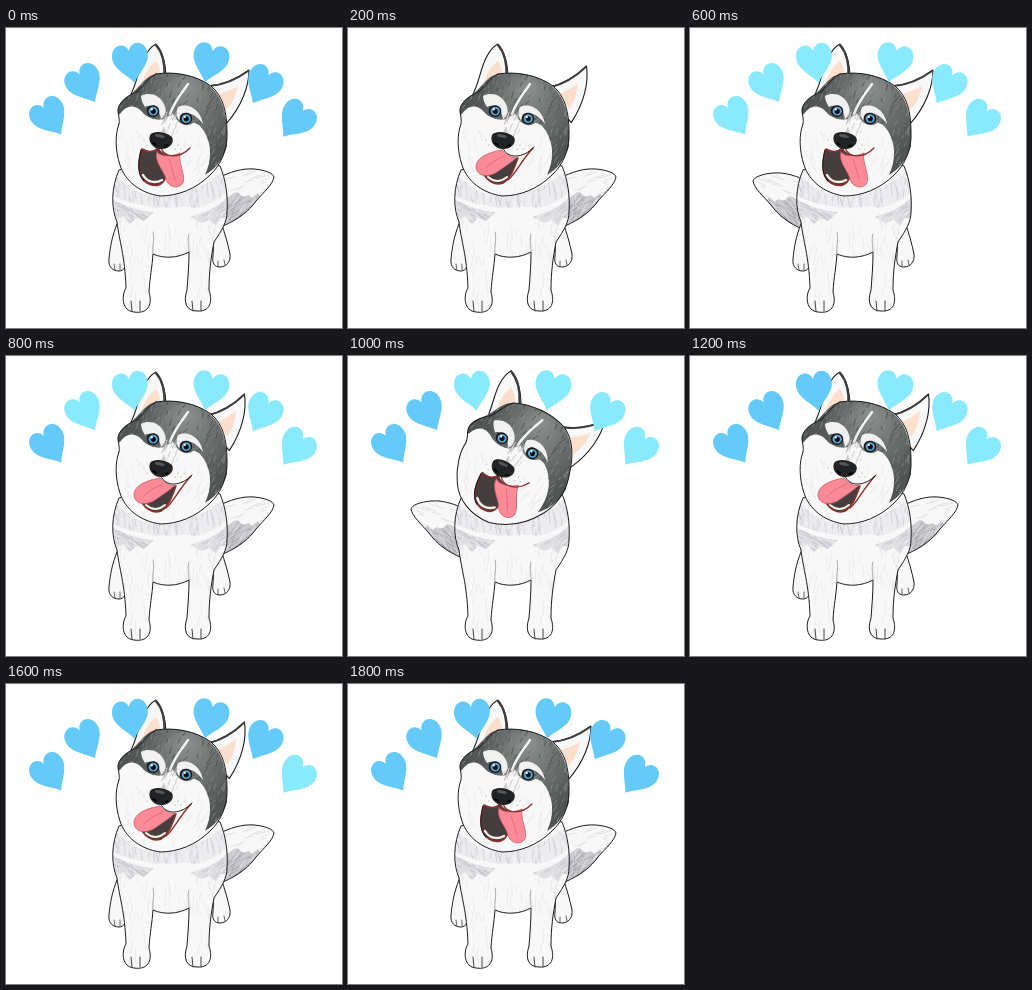
An HTML page with a canvas that plays this animation: 336x300 px, repeating every 2000 ms.

```html
<!DOCTYPE html>
<html lang="en">
<head>
<meta charset="utf-8">
<title>Happy husky</title>
<style>
html, body { margin: 0; width: 100%; height: 100%; overflow: hidden; background: #fff; }
canvas { display: block; width: 336px; height: 300px; }
</style>
</head>
<body>
<canvas id="stage" width="336" height="300"></canvas>
<script>
const ctx = document.getElementById('stage').getContext('2d');
const STEP = 200;
const INK = '#1c1d20', WHITE = '#f9f8f8', PEACH = '#fbdfcd';
const DARK_HEART = '#64caf9', LIGHT_HEART = '#88e9ff';

// Each step: head pose, tail side, raised paws, hind legs, blue hearts (-1 hides all)
const steps = [
  ['pant', 'right', 0, 1, 6],
  ['lick', 'right', 0, 1, -1],
  ['tilt', 'right', 1, 1, -1],
  ['pant', 'left', 0, 1, 0],
  ['lick', 'right', 0, 1, 1],
  ['tilt', 'left', 0, 0, 2],
  ['lick', 'right', 0, 1, 3],
  ['pant', 'right', 1, 1, 4],
  ['lick', 'right', 0, 1, 5],
  ['pant', 'right', 0, 1, 6]
];

// Left and right ear turn in degrees
const earTurn = { pant: [0, 0], lick: [0, -8], tilt: [-13, 0] };

// x, y, tilt in degrees
const hearts = [
  [44, 89, -33], [79, 56, -29], [125, 34, -10],
  [204, 34, 14], [257, 57, 29], [290, 92, 37]
];

function random(seed) {
  return () => (seed = (seed * 16807) % 2147483647) / 2147483647;
}

function shape(d, fill, line, width = 1) {
  const p = new Path2D(d);
  if (fill) { ctx.fillStyle = fill; ctx.fill(p); }
  if (line) { ctx.strokeStyle = line; ctx.lineWidth = width; ctx.stroke(p); }
}

function line(d, color = INK, width = 1) {
  shape(d, null, color, width);
}

// Draw with the stage turned about a point
function turned(x, y, degrees, paint) {
  ctx.save();
  ctx.translate(x, y);
  ctx.rotate(degrees * Math.PI / 180);
  ctx.translate(-x, -y);
  paint();
  ctx.restore();
}

// Short pencil hairs inside a path; the box is x, y, width, height
function fur(d, [x, y, w, h], count, colors, slope, length) {
  const rnd = random(count * 31 + x);
  ctx.save();
  ctx.clip(new Path2D(d));
  ctx.lineWidth = 0.8;
  for (let i = 0; i < count; i++) {
    const px = x + rnd() * w, py = y + rnd() * h;
    const a = slope + (rnd() - 0.5) * 0.7, n = length * (0.5 + rnd());
    ctx.strokeStyle = colors[i % colors.length];
    ctx.beginPath();
    ctx.moveTo(px, py);
    ctx.lineTo(px + Math.cos(a) * n, py + Math.sin(a) * n);
    ctx.stroke();
  }
  ctx.restore();
}

function dot(x, y, rx, ry, fill, turn = 0) {
  ctx.beginPath();
  ctx.ellipse(x, y, rx, ry, turn, 0, Math.PI * 2);
  ctx.fillStyle = fill;
  ctx.fill();
}

function heart([x, y, tilt], color) {
  ctx.save();
  ctx.translate(x, y);
  ctx.rotate(tilt * Math.PI / 180);
  shape('M0 21C-5 13-18 5-18-6C-18-20-3-22 0-11C3-22 18-20 18-6C18 5 5 13 0 21Z', color);
  ctx.restore();
}

function tail(side) {
  ctx.save();
  if (side === 'left') {
    ctx.translate(331, 4);
    ctx.scale(-1, 1);
  }
  const d = 'M212 150C224 144 236 140 248 141C259 142 267 145 268 149C267 156 258 164 250 173C243 183 233 191 217 198Z';
  shape(d, WHITE);
  const grey = 'M216 172C224 172 228 160 234 166C238 172 242 164 246 170L252 165L254 169C244 181 236 190 216 198Z';
  shape(grey, '#c9c9cd');
  fur(grey, [212, 160, 44, 40], 120, ['#a3a3aa', '#b9b9bf', '#dcdce0', '#94949b'], -0.75, 9);
  fur(d, [220, 141, 46, 36], 30, ['#dcdce0'], -0.5, 9);
  line(d, INK, 1);
  ctx.restore();
}

function hindLegs() {
  shape('M111 196C106 208 104 220 103 231C102 239 107 243 113 243C118 243 121 238 120 230L118 204Z', WHITE, INK);
  line('M108 236L109 242M114 236L114 242', '#55555a', 0.9);
  shape('M215 194C219 206 222 216 224 226C225 234 220 239 214 239C208 239 206 235 207 228L208 204Z', WHITE, INK);
  line('M212 233L212 238M218 232L219 237', '#55555a', 0.9);
}

function torso(raised) {
  const up = raised * 6, l = raised * -1.5, r = raised * 2;
  const y = n => n - up, a = n => n + l, b = n => n + r;
  const d = `M113 142C105 160 105 180 111 194C113 212 119 228 ${a(120)} ${y(260)}
    C${a(115)} ${y(268)} ${a(116)} ${y(283)} ${a(128)} ${y(284)}
    C${a(141)} ${y(286)} ${a(147)} ${y(278)} ${a(143)} ${y(264)}
    C144 248 146 240 147 226C158 231 172 230 183 224
    C183 238 182 248 ${b(181)} ${y(262)}
    C${b(177)} ${y(274)} ${b(180)} ${y(283)} ${b(191)} ${y(283)}
    C${b(204)} ${y(284)} ${b(207)} ${y(274)} ${b(203)} ${y(262)}
    C203 244 205 230 208 214C216 202 221 194 221 184C222 168 220 152 214 138Z`;
  shape(d, WHITE);
  const collar = 'M110 146C124 164 142 168 158 169C180 167 202 156 217 143L221 164C210 174 200 178 188 180C176 176 168 182 158 179C148 182 138 176 130 176C120 174 112 170 107 168Z';
  const left = 'M107 172C120 178 134 184 148 184L138 193L130 190L124 196L117 189L110 190Z';
  const right = 'M222 168C212 180 198 185 184 189L196 195L204 192L210 198L215 190L221 190Z';
  const greys = ['#c6c6cc', '#d6d6db', '#f3f3f5', '#bcbcc3'];
  shape(collar, '#ececef');
  fur(collar, [106, 144, 116, 40], 170, ['#d2d2d7', '#dedee2', '#f5f5f6', '#cacad0'], 1.5, 9);
  shape(left, '#dedee2');
  fur(left, [105, 170, 46, 28], 80, greys, 0.6, 8);
  shape(right, '#dedee2');
  fur(right, [183, 166, 42, 34], 80, greys, 2.45, 8);
  fur(d, [112, 186, 104, 44], 55, ['#e6e6e9', '#edebea'], 1.55, 12);
  fur(d, [116, 225, 92, 55], 22, ['#e8e8ec'], 1.55, 10);
  line(d);
  line('M147 226C146 218 149 212 147 204M183 224C183 216 181 212 183 206', '#a2a2a8', 0.9);
  for (const x of [a(129), b(190)])
    line(`M${x - 4} ${y(273)}L${x - 3} ${y(283)}M${x + 5} ${y(273)}L${x + 5} ${y(283)}`, '#45454a', 1);
}

function leftEar() {
  shape('M124 68C131 56 132 42 138 30C142 22 146 18 150 16C157 24 160 36 160 52L146 66Z', WHITE, INK, 1.1);
  shape('M135 57C138 46 143 38 150 33C154 39 155 46 153 53Z', PEACH);
  line('M150 17C157 25 159 36 158.500 49', '#3c3d40', 2.2);
}

function rightEar() {
  shape('M202 58C218 57 232 50 243 42C243 58 236 78 220 96L210 80Z', WHITE, INK, 1.1);
  shape('M211 66C219 65 226 61 232 58C230 68 226 76 220 82Z', PEACH);
  line('M204 58C218 57 231 51 242 43', '#3c3d40', 2);
}

function eye(x, y) {
  dot(x, y, 6.3, 5.8, '#17181b', 0.2);
  dot(x + 0.2, y + 0.2, 4.6, 4.4, '#5ba4cf');
  dot(x + 0.3, y + 0.3, 2.5, 2.6, '#0a0c10');
  dot(x - 1.2, y - 1.6, 1.1, 1.1, '#fff');
}

function openMouth() {
  shape('M136 121C132 134 131 148 141 155C150 160 157 157 160 149L166 128C160 129 154 124 152 120C147 125 141 124 136 121Z', '#463e3e', '#8f2f2c', 1.6);
  line('M135 122C132 134 131 146 138 153', INK, 1.2);
  line('M137 147C141 154 149 156 156 152', '#f7f1ea', 2.4);
  shape('M151 124C156 130 167 128 174 125C172 135 180 147 177 155C172 162 162 159 160 151C158 142 148 134 151 124Z', '#fb8a96', '#c8606b', 0.8);
  line('M163 131C165 139 168 145 169 152', '#e06f7c');
  line('M155 120C159 130 173 131 184 120', '#7d2f2d', 1.2);
}

function lickMouth() {
  shape('M135 145C139 153 147 158 155 155C163 150 166 141 170 130L156 132Z', '#463e3e', '#8f2f2c', 1.5);
  line('M140 149C146 154 153 154 159 149', '#f7f1ea', 2);
  line('M160 152C168 146 172 134 185 120', '#8f2f2c', 1.4);
  shape('M154 122C142 124 128 129 128 139C129 150 142 149 149 144C156 139 163 135 168 130C162 129 157 126 154 122Z', '#fb8a96', '#c8606b', 0.8);
  line('M157 128C150 131 143 134 138 140', '#e06f7c');
  line('M155 120C159 131 175 131 186 119');
}

function head(pose) {
  const [leftTurn, rightTurn] = earTurn[pose];
  turned(142, 58, leftTurn, leftEar);
  turned(212, 72, rightTurn, rightEar);
  const skull = 'M150 46C168 43 190 47 205 58C217 68 221 84 221 104C222 122 214 138 204 147C190 161 172 168 154 168C134 165 119 153 114 137C109 122 109 106 113 96C114 91 112 87 112 81C114 72 124 67 132 63C138 56 144 49 150 46Z';
  shape(skull, WHITE);
  const mask = 'M112 86C111 80 114 73 122 68C132 63 138 48 150 46C175 42 198 50 208 62C220 76 222 98 221 118C217 132 209 141 199 147C206 132 206 116 198 103C194 97 191 95 187 95C182 99 175 97 171 92L167 86L158 91C151 93 143 90 138 86C132 78 125 77 120 80C116 82 114 88 112 86Z';
  const shade = ctx.createRadialGradient(180, 60, 6, 182, 78, 52);
  shade.addColorStop(0, '#888b8b');
  shade.addColorStop(1, '#505453');
  shape(mask, shade);
  fur(mask, [108, 44, 116, 104], 420, ['#4a4e4d', '#7b7e7e', '#606463', '#8b8e8e'], -1.1, 5);
  shape('M135 68C143 64 153 66 158 76C161 82 160 88 155 91C154 82 146 75 139 79C137 76 135 72 135 68Z', '#f1f1f1');
  shape('M172 79C182 74 195 82 197 96C193 90 186 84 178 85L173 92C170 88 170 83 172 79Z', '#f1f1f1');
  line('M182 56C176 65 169 72 164 86', '#f4f4f4', 2.4);
  fur(skull, [158, 84, 14, 20], 26, ['#b9bbbd', '#d2d3d5'], 1.9, 6);
  fur(skull, [112, 100, 30, 56], 26, ['#e8e8ea', '#f1ece6'], 1.1, 9);
  fur(skull, [168, 110, 36, 48], 24, ['#e6e6e9', '#f1ece6'], 2.1, 8);
  line(skull);
  eye(147, 83);
  eye(180, 90.5);
  pose === 'lick' ? lickMouth() : openMouth();
  shape('M144 107C148 102 160 104 166 109C169 115 163 121 156 121C149 122 141 115 144 107Z', '#222325');
  dot(154, 108, 5, 1.6, '#55565a', 0.2);
  line('M147 115L150 117M159 118L162 117', '#000', 1.6);
  for (const [x, y] of [[138, 112], [141, 117], [172, 117], [175, 121], [169, 121]])
    dot(x, y, 0.5, 0.5, '#88888c');
}

function draw([pose, side, raised, hind, blue]) {
  ctx.fillStyle = '#fff';
  ctx.fillRect(0, 0, 336, 300);
  ctx.lineCap = ctx.lineJoin = 'round';
  tail(side);
  if (hind) hindLegs();
  torso(raised);
  turned(154, 112, pose === 'tilt' ? 13.5 : 0, () => head(pose));
  if (blue >= 0) hearts.forEach((h, i) => heart(h, i < blue ? DARK_HEART : LIGHT_HEART));
}

let shown = -1;
function tick() {
  const i = Math.floor(performance.now() / STEP) % steps.length;
  if (i !== shown) draw(steps[shown = i]);
  requestAnimationFrame(tick);
}
tick();
</script>
</body>
</html>
```
